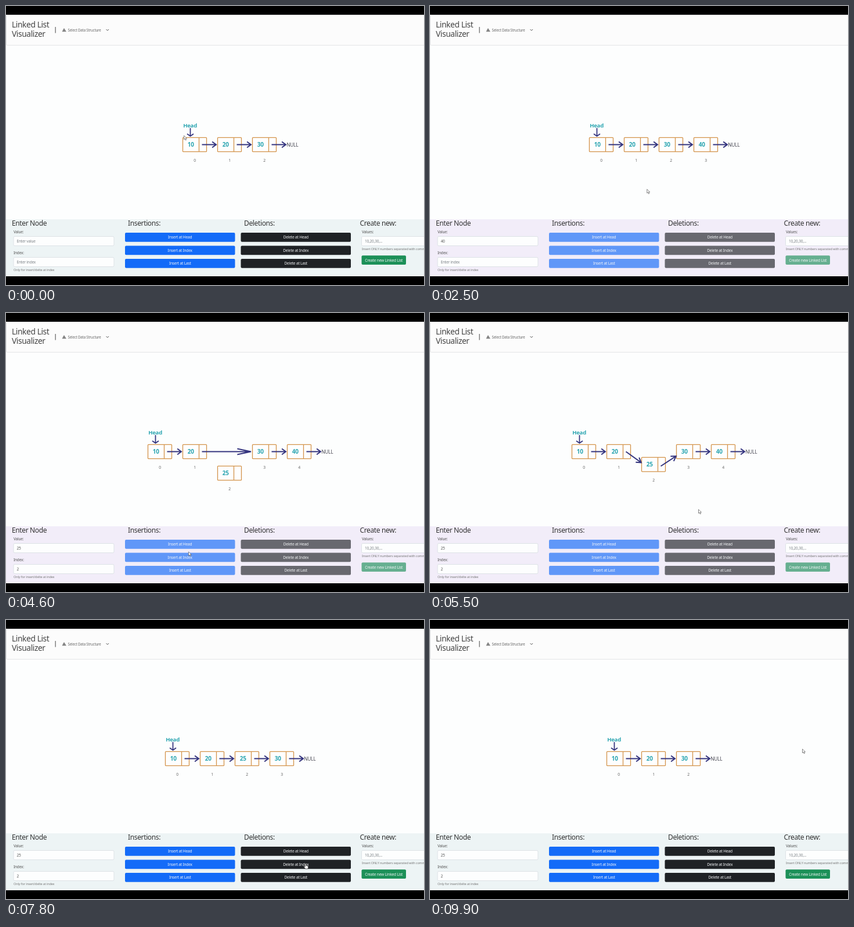
Animation, 720 px wide and 480 px high, one loop 10000 ms. Source, as an HTML page:

```html
<!DOCTYPE html>
<html lang="en">
<head>
<meta charset="utf-8">
<title>Linked List Visualizer</title>
<style>
  html, body { margin: 0; width: 100%; height: 100%; overflow: hidden; background: #000; }
  svg { display: block; width: 720px; height: 480px; }
  text { font-family: "Noto Sans", "Open Sans", sans-serif; letter-spacing: -.03em; white-space: pre; }
</style>
</head>
<body>
<svg id="stage" viewBox="0 0 720 480"></svg>
<script>
const LOOP = 10000, MID = 238.5, DROP = 37;
const TEAL = '#2ba5b1', NAVY = '#35357f', ORANGE = '#d3934a';

// start time, kind, list including the affected node, index of that node
const operations = [
  [1100, 'insert', [10, 20, 30, 40], 3],
  [4400, 'insert', [10, 20, 25, 30, 40], 2],
  [6100, 'delete', [10, 20, 25, 30, 40], 4],
  [8100, 'delete', [10, 20, 25, 30], 2]
];

// time, x, y of the pointer tip
const pointerPath = [
  [50, 306.5, 223], [400, 60, 402], [750, 60, 402], [1050, 300, 440], [1200, 300, 440],
  [1650, 461.5, 291], [2350, 461.5, 291], [2850, 60, 402], [3300, 60, 402], [3550, 60, 437],
  [3750, 120, 437], [3900, 186, 435], [4300, 300, 418], [4500, 300, 418], [5050, 462.5, 338],
  [5600, 462.5, 338], [6000, 503, 441], [7300, 503, 441], [7700, 516, 419], [8200, 516, 419],
  [9400, 641.5, 222]
];

const clamp = v => Math.max(0, Math.min(1, v));
const ramp = (t, start, length) => clamp((t - start) / length);
const between = (t, a, b) => t >= a && t < b;

const text = (x, y, s, size, fill = '#555', extra = '') =>
  `<text x="${x}" y="${y}" font-size="${size}" fill="${fill}" ${extra}>${s}</text>`;
const rect = (x, y, w, h, fill, extra = '') =>
  `<rect x="${x}" y="${y}" width="${w}" height="${h}" fill="${fill}" ${extra}/>`;
const path = (d, stroke, width, extra = '') =>
  `<path d="${d}" fill="none" stroke="${stroke}" stroke-width="${width}" ${extra}/>`;
const centered = 'text-anchor="middle"';

function header() {
  return rect(0, 15, 720, 450, '#fdfefe') +
    rect(.5, 15.5, 730, 52, '#fcfcfc', 'rx="2" stroke="#e4e5e6"') +
    text(10, 37.3, 'Linked List', 13.8, '#444', 'font-weight="500"') +
    text(10, 53, 'Visualizer', 13.8, '#444', 'font-weight="500"') +
    rect(84.5, 36, 1.4, 10.5, '#777') +
    '<path d="M100 38l1.6 2.6 2.4 3.6h-7.4l1.8-3.6z" fill="#858585"/>' +
    text(106.5, 43.8, 'Select Data Structure', 6.2, '#666') +
    path('M172.5 40l2.3 2.3 2.3-2.3', '#555', 1);
}

function input(x, y, width, value, hint, focused) {
  const caret = focused ? path(`M${x + 6.5 + value.length * 3.6} ${y + 4}v8`, '#333', .7) : '';
  return rect(x, y, width, 16, '#fdfefe', `rx="2" stroke="${focused ? '#86b0f2' : '#dde2e6'}"`) +
    text(x + 5.5, y + 10.4, value || hint, 6.5, value ? '#555' : '#7d8287') + caret;
}

function button(x, y, width, height, label, fill, busy) {
  return rect(x, y, width, height, fill, `rx="2" opacity="${busy ? .65 : 1}"`) +
    text(x + width / 2, y + 10.3, label, 6.6, '#f4f6f8', centered);
}

function suggestions(t) {
  const alpha = Math.min(ramp(t, 3570, 60), ramp(-t, -3975, 100));
  if (!alpha) return '';
  return `<g opacity="${alpha}">` + rect(13, 366, 174, 66, '#fcfdfd') +
    [1, 3, 6, 34].map((s, i) => text(19.5, 379 + 15 * i, s, 6.2)).join('') + '</g>';
}

function panel(t, busy) {
  const value = t < 600 ? '' : t < 700 ? '4' : t < 2900 ? '40' : t < 3000 ? '' : t < 3200 ? '2' : '25';
  const onValue = between(t, 450, 1050) || between(t, 2850, 3450);
  const onIndex = between(t, 3550, 4300);
  const heading = (x, s) => text(x, 378, s, 12, '#333', 'font-weight="500"');
  let out = rect(0, 367, 720, 98, busy ? '#f2edf9' : '#edf4f5') +
    heading(10, 'Enter Node') + heading(210, 'Insertions:') +
    heading(410, 'Deletions:') + heading(609.5, 'Create new:') +
    text(13, 390.6, 'Value:', 6.5) + text(13, 426.6, 'Index:', 6.5) + text(613, 390.6, 'Values:', 6.5) +
    input(13, 396.5, 173, value, 'Enter value', onValue) +
    input(13, 432.5, 173, t < 3800 ? '' : '2', 'Enter index', onIndex) +
    input(612.5, 396.5, 120, '', '10,20,30,...', false) +
    text(13, 455.8, 'Only for insert/delte at index', 5.6, '#777') +
    text(613, 419.8, 'Insert ONLY numbers separated with comma', 5.6, '#777');
  ['Head', 'Index', 'Last'].forEach((place, i) => {
    const y = 390 + 22.5 * i;
    out += button(205, y, 189.5, 15.8, 'Insert at ' + place, '#136bf8', busy) +
      button(404.5, y, 189.5, 15.8, 'Delete at ' + place, '#1f2225', busy);
  });
  out += button(612.5, 429.3, 76.5, 15.8, 'Create new Linked List', '#1c9058', busy);
  if (onIndex) out += '<path d="M176 439.5l2-2.5 2 2.5zM176 441.5l2 2.5 2-2.5z" fill="#555"/>';
  return out + suggestions(t);
}

function arrow(x1, y1, x2, y2, alpha = 1) {
  const dx = x2 - x1, dy = y2 - y1, length = Math.hypot(dx, dy);
  const head = Math.abs(dy) < 1 ? .28 * length : 8;
  return `<g transform="translate(${x1} ${y1}) rotate(${Math.atan2(dy, dx) * 180 / Math.PI})" opacity="${alpha}">` +
    path(`M0 0H${length}M${length - head} -5L${length} 0L${length - head} 5`, NAVY, 2) + '</g>';
}

function linkedList(kind, list, k, age) {
  const n = list.length, inserting = kind === 'insert';
  const spread = inserting ? ramp(age, 0, 200) : 1 - ramp(age, 1550, 150);
  const alpha = inserting ? spread : 1 - ramp(age, 1100, 150);
  const drop = DROP * (inserting ? 1 - ramp(age, 900, 500) : ramp(age, 250, 500));
  const linked = inserting ? age >= 800 : age < 800;
  const outgoing = inserting ? ramp(age, 300, 150) : alpha;
  const left = 394.5 - 30 * (n - 1 + spread);
  const slot = i => i > k ? i - 1 + spread : i;
  const x = i => left + 60 * slot(i);
  const offset = i => i === k ? drop : 0;

  function link(i) {
    const next = i === k - 1 && !linked ? k + 1 : i + 1;
    const d = offset(i) - offset(next), up = d > 0;
    const lean = next === n ? -.1 * Math.abs(d) : .08 * Math.abs(d);
    return arrow(x(i) + 33, MID + offset(i) + (up ? .13 * d : 0),
      x(next) - 2.5 + lean, MID + offset(next) + d * (up ? .35 : .15), i === k ? outgoing : 1);
  }

  const nodes = list.map((value, i) => {
    const px = x(i), top = MID - 12.2 + offset(i);
    return `<g opacity="${i === k ? alpha : 1}">` +
      rect(px, top, 41, 24.4, '#fefefe', `rx="1" stroke="${ORANGE}" stroke-width="1.3"`) +
      path(`M${px + 28} ${top}v24.4`, ORANGE, 1.3) +
      text(px + 13.7, top + 15.8, value, 10, TEAL, centered + ' font-weight="700"') +
      text(px + 20.5, top + 42, Math.round(slot(i)), 6.8, '#666', centered) + '</g>';
  }).join('');

  return nodes + list.map((_, i) => link(i)).join('') +
    text(left + .7, 208.6, 'Head', 9.6, TEAL, 'font-weight="700"') +
    path(`M${left + 13} 210v14m-5.5 -4l5.5 4l5.5 -4`, NAVY, 1.8) +
    text(x(n) - 1.3, 241.8, 'NULL', 8.3, '#4a4a55', 'font-weight="500"');
}

function pointer(t) {
  let i = pointerPath.findIndex(p => p[0] > t);
  if (i < 0) i = pointerPath.length - 1;
  const [t2, x2, y2] = pointerPath[i], [t1, x1, y1] = pointerPath[Math.max(0, i - 1)];
  const u = t2 > t1 ? ramp(t, t1, t2 - t1) : 0, e = u * u * (3 - 2 * u);
  const x = x1 + (x2 - x1) * e, y = y1 + (y2 - y1) * e;
  const rows = start => y > start && (y - start) % 22.5 < 16 && y < start + 61;
  const overButton = x > 205 && x < 594 && !between(x, 394.5, 404.5) && rows(390);
  const overInput = between(x, 13, 186) && (between(y, 396, 413) || between(y, 432, 449));
  const shape = overButton
    ? 'M-.8 0.6q.8-1 1.6 0v3l3 .8q.9.4.7 1.6l-.7 3h-4l-2.6-3.6q.2-1 1.2-.4l.8.7z'
    : overInput ? 'M-1.5 0h3M0 0v7M-1.5 7h3'
    : 'M0 0v6.6l1.6-1.4 1.2 2.7 1.2-.6-1.2-2.5h2.2z';
  return `<path transform="translate(${x} ${y})" d="${shape}" fill="#fff" stroke="#555" stroke-width=".7"/>`;
}

function draw(now) {
  const t = now % LOOP;
  const [start, kind, list, k] = operations.filter(op => op[0] <= t).pop() || operations[0];
  const age = t - start;
  const busy = between(age, 0, kind === 'insert' ? 1450 : 1650);
  stage.innerHTML = header() + linkedList(kind, list, k, age) + panel(t, busy) + pointer(t);
}

const stage = document.getElementById('stage'), began = performance.now();
function tick() {
  draw(performance.now() - began);
  requestAnimationFrame(tick);
}
tick();
</script>
</body>
</html>
```
